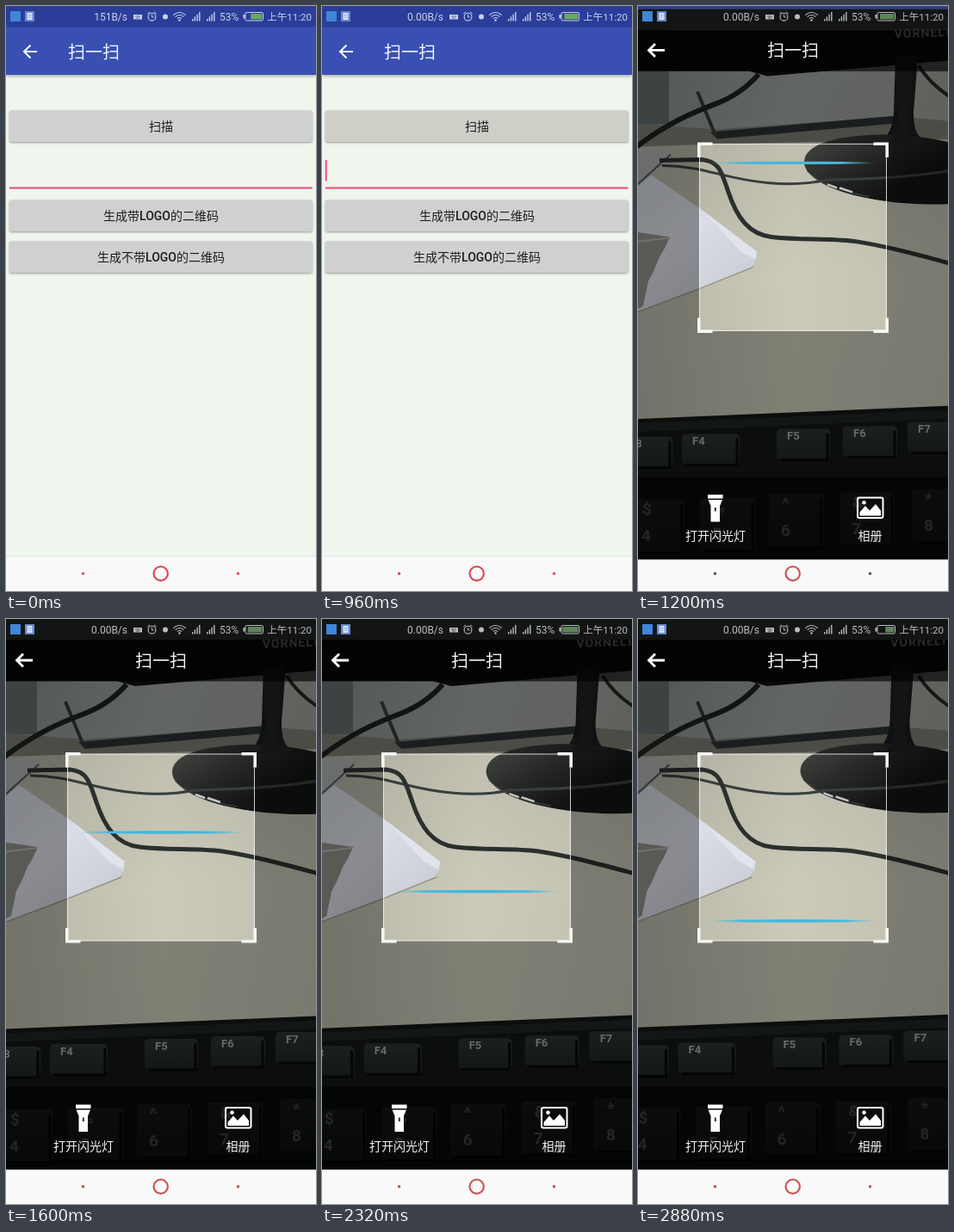
Write an HTML page with a canvas that moves like this. It is 360 by 680 pixels and loops after 2.96 s.

```html
<!DOCTYPE html>
<html lang="zh-CN">
<head>
<meta charset="utf-8">
<title>扫一扫</title>
<style>
html, body { margin: 0; width: 100%; height: 100%; overflow: hidden; background: #eff6ee; }
canvas { display: block; width: 360px; height: 680px; }
</style>
</head>
<body>
<canvas id="stage"></canvas>
<script>
const W = 360, H = 680, LOOP = 2960, STEP = 80;
const FONT = 'Roboto, "Noto Sans CJK SC", "Noto Sans CJK", sans-serif';
const canvas = document.getElementById('stage');
const c = canvas.getContext('2d');
const dpr = window.devicePixelRatio || 1;
canvas.width = W * dpr;
canvas.height = H * dpr;

// Piecewise linear track: [time, value] pairs
function track(points, t) {
  let [t0, v0] = points[0];
  if (t <= t0) return v0;
  for (const [t1, v1] of points) {
    if (t < t1) return v0 + (v1 - v0) * (t - t0) / (t1 - t0);
    t0 = t1; v0 = v1;
  }
  return v0;
}
const SCAN = [[1080, 0], [1200, 22], [1400, 59], [1600, 91], [1800, 115], [2000, 136], [2280, 157], [2560, 176], [2880, 194]];
const SLIDE = [[1040, 30], [1120, 13], [1200, 3.4], [1280, 0.6], [1360, 0]];
const DRIFT = [[1600, 0], [2000, -1.5], [2560, -3], [2880, -4.5]];
const CHARGE = [[0, 14], [960, 17], [2000, 18], [2560, 20], [2800, 20], [2880, 11]];

function rect(x, y, w, h, color) {
  c.fillStyle = color;
  c.fillRect(x, y, w, h);
}
function shape(d, color) {
  c.fillStyle = color;
  c.fill(new Path2D(d));
}
function line(d, color, width, cap = 'butt') {
  c.strokeStyle = color;
  c.lineWidth = width;
  c.lineCap = cap;
  c.stroke(new Path2D(d));
}
function disc(x, y, r, color) {
  c.fillStyle = color;
  c.beginPath();
  c.arc(x, y, r, 0, Math.PI * 2);
  c.fill();
}
function ring(x, y, r, color, width) {
  c.strokeStyle = color;
  c.lineWidth = width;
  c.beginPath();
  c.arc(x, y, r, 0, Math.PI * 2);
  c.stroke();
}
function rounded(x, y, w, h, r) {
  c.beginPath();
  c.roundRect(x, y, w, h, r);
}
function text(str, x, y, size, color, align = 'left', weight = 400) {
  c.font = `${weight} ${size}px ${FONT}`;
  c.textAlign = align;
  c.textBaseline = 'alphabetic';
  c.fillStyle = color;
  c.fillText(str, x, y);
}
function gradient(x0, y0, x1, y1, ...colors) {
  const g = c.createLinearGradient(x0, y0, x1, y1);
  colors.forEach((col, i) => g.addColorStop(i / (colors.length - 1), col));
  return g;
}
function shadow(color, blur, y) {
  c.shadowColor = color;
  c.shadowBlur = blur * dpr;
  c.shadowOffsetY = y * dpr;
}

function statusBar(t, inCamera) {
  const ink = inCamera ? '#b9bbc0' : '#c9d0ea';
  rect(5, 6, 12, 12, '#3f86d8');
  rect(22, 6, 11, 12, '#6389d2');
  rect(24.5, 8, 6, 8, '#dde5f6');
  line('M25.5 10.5H29.5M25.5 13H29.5', '#6f8bd0', 0.8);
  text(t < 480 ? '151B/s' : '0.00B/s', 141, 17, 12, ink, 'right');

  rect(148, 10, 10, 5.5, ink);
  line('M150 12H156M151 14H155', inCamera ? '#222' : '#2c3e99', 0.7);
  ring(169.5, 12.7, 4.4, ink, 1.1);
  line('M169.5 10V13H171.8M164.3 9L167 6.8M172 6.8L174.7 9', ink, 1);
  disc(185, 12.5, 3, ink);
  for (const r of [3.5, 6.5, 9.5]) {
    c.strokeStyle = ink;
    c.lineWidth = 1.2;
    c.beginPath();
    c.arc(201.5, 17, r, -Math.PI * 0.77, -Math.PI * 0.23);
    c.stroke();
  }
  disc(201.5, 16.5, 1.2, ink);
  for (const x of [216, 233]) {
    for (let i = 0; i < 4; i++) rect(x + i * 2.7, 15 - i * 2.7, 1.4, 2.5 + i * 2.7, ink);
  }
  text('53%', 248, 17, 12, ink);
  c.strokeStyle = ink;
  c.lineWidth = 1;
  rounded(278, 7.5, 20.5, 9.5, 1.5);
  c.stroke();
  rect(275.5, 10, 2, 4.5, ink);
  const w = Math.min(18, track(CHARGE, t) - 1);
  rect(297.3 - w, 9, w, 6.5, inCamera ? '#5d8658' : '#69a860');
  text('上午11:20', 355, 17, 11.5, ink, 'right');
}

function navIcons(ringColor, dotColor) {
  ring(179.7, 659.7, 8.2, ringColor, 2.1);
  disc(89.5, 659.7, 1.8, dotColor);
  disc(269.5, 659.7, 1.8, dotColor);
}

function button(label, y, color) {
  c.save();
  shadow('rgba(0,0,0,.38)', 2.5, 1);
  rounded(4, y, 351.5, 36.5, 2);
  c.fillStyle = color;
  c.fill();
  c.restore();
  text(label, 180, y + 23.5, 14, '#1d1d1d', 'center', 500);
}

function formPage(t) {
  rect(0, 0, W, H, '#eff6ee');
  c.save();
  shadow('rgba(0,0,0,.4)', 4, 1);
  rect(0, 0, W, 80, '#3950b2');
  c.restore();
  rect(0, 0, W, 24.5, '#2b3d99');
  line('M36 53H21.5M28.5 45.5L21 53L28.5 60.5', '#fff', 2);
  text('扫一扫', 72, 60.5, 20, '#f4f6ff');

  button('扫描', 121.5, t >= 880 ? '#cfcec7' : '#d0d0d0');
  button('生成带LOGO的二维码', 225.5, '#d0d0d0');
  button('生成不带LOGO的二维码', 273.5, '#d0d0d0');
  const pink = t < 480 ? '#e5487d' : '#f5427f';
  rect(4, 210.5, 351.5, 2, pink);
  if (t >= 480 && t < 1040) rect(3.8, 179, 1.8, 24.5, pink);
  rect(0, 639, W, 1, '#e2e4e2');
  rect(0, 640, W, 40, '#f9f9f9');
}

function keyCap(x, y, w, h) {
  c.fillStyle = gradient(0, y, 0, y + h, '#2c322f', '#1e2421');
  rounded(x, y, w, h, 5);
  c.fill();
  line(`M${x + 4} ${y + h}H${x + w - 3}V${y + 5}`, '#070908', 3);
}

function keyboard() {
  shape('M-10 477L370 461V660H-10Z', '#121614');
  shape('M-10 482L370 466V476L-10 492Z', '#1d2320');
  const top = [['F3', -22, 497, 62], ['F4', 51, 494, 67], ['F5', 161, 488, 62], ['F6', 238, 485, 63], ['F7', 313, 480, 62]];
  for (const [name, x, y, w] of top) {
    keyCap(x, y, w, 36);
    text(name, x + 12, y + 12.5, 13, '#a2a8a4', 'left', 700);
  }
  const digits = [['$', '4', -10, 570], ['%', '5', 72, 568], ['^', '6', 152, 564], ['&', '7', 234, 562], ['*', '8', 318, 558]];
  for (const [sign, digit, x, y] of digits) {
    keyCap(x, y, 64, 62);
    text(sign, x + 15, y + 18, 19, '#8d938f', 'left', 700);
    text(digit, x + 14, y + 49, 19, '#8d938f', 'left', 700);
  }
}

function monitorStand() {
  shape('M299 55H325L320 120C320 140 324 148 334 154L280 156C292 147 296 136 297 120Z', '#1a1b1c');
  const base = 'M193 178C193 160 220 148 278 146C325 146 352 152 376 159V226C314 230 266 222 236 212C210 203 193 191 193 178Z';
  shape(base, gradient(220, 145, 270, 225, '#3f413d', '#262827', '#121413'));
  line('M196 188C212 204 240 213 268 218', '#4b4e4d', 1);
  line('M220 204L231 208M234 208L249 213', '#c4c8c5', 2.4);
  shape('M300 70H320L315 130C315 143 317 149 324 155L291 157C301 145 302 136 302 122Z', '#1e201f');
}

function photo(t) {
  const dx = track(DRIFT, t), dy = dx * 0.35;
  rect(0, 0, W, H, gradient(0, 150, 0, 470, '#bfbeaf', '#cccbba', '#cac9b8'));
  rect(0, 150, W, 330, gradient(0, 0, W, 0, 'rgba(0,0,0,.1)', 'rgba(0,0,0,0)', 'rgba(0,0,0,.05)'));
  rect(0, 24, W, 128, gradient(0, 24, W, 150, '#7f8786', '#9ba09e', '#989a93'));
  rect(0, 24, 36, 110, '#616a69');
  shape('M0 133L90 140L300 125L360 130V151L90 157L0 160Z', '#77786e');
  shape('M84 143L300 124V133L92 151Z', '#2b302f');
  line('M69 96L90 147', '#333837', 4);
  shape('M0 24H360V60L150 78L128 72H0Z', '#0c0e0d');

  c.save();
  c.translate(dx / 3, 0);
  shape('M-5 202L14 192L72 232L138 282L137 292L130 301L72 325L-5 354Z', gradient(0, 200, 110, 330, '#cdd1da', '#dadde6', '#cbced5'));
  shape('M76 235L138 282L136 291L119 282Z', '#e1e4eb');
  line('M134 300L72 325L-5 354', '#96958c', 1.5);
  shape('M-5 163L39 166L34 177L-5 210Z', '#a9adac');
  line('M38 169L-5 208', '#505453', 2);
  shape('M-5 259L37 265L31 278L25 288L18 305L12 316L6 345L-5 352Z', '#8d8d88');
  line('M-5 271L36 266', '#b1b1ab', 2);
  c.restore();

  c.save();
  c.translate(dx, dy);
  monitorStand();
  c.restore();
  line('M-3 161C34 133 62 121 91 110C112 102 127 91 140 76', '#1c201f', 6);
  line('M326 66C335 81 347 92 362 102', '#222625', 4);
  line('M28 182C75 182 101 198 150 202C181 205 200 203 218 199C249 198 315 197 362 188', '#393d3b', 3);
  line('M25 176L74 175C95 177 97 190 105 213C115 243 129 262 155 265C190 269 220 266 251 270C290 276 326 286 363 296', '#2b2f2d', 5);

  c.save();
  c.translate(dx, dy);
  keyboard();
  c.translate(298, 34);
  c.rotate(-0.04);
  c.letterSpacing = '1px';
  text('VORNELT', 0, 0, 14, '#b4b6b8', 'left', 700);
  c.restore();
}

function scanFrame(t) {
  const x = 71.5, y = 157, size = 217;
  c.fillStyle = 'rgba(0,0,0,.37)';
  c.beginPath();
  c.rect(0, 0, W, H);
  c.rect(x, y, size, size);
  c.fill('evenodd');
  c.strokeStyle = 'rgba(255,255,255,.8)';
  c.lineWidth = 1;
  c.strokeRect(x, y, size, size);
  for (const [cx, cy, sx, sy] of [[69, 155, 1, 1], [291, 155, -1, 1], [69, 376.5, 1, -1], [291, 376.5, -1, -1]]) {
    c.save();
    c.translate(cx, cy);
    c.scale(sx, sy);
    shape('M0 0H17.5V3.6H3.6V17.5H0Z', '#f6f6f3');
    c.restore();
  }
  c.fillStyle = gradient(82, 0, 278, 0, 'rgba(70,185,222,0)', '#46b9de', '#3fb9e0', '#3fb9e0', '#46b9de', 'rgba(70,185,222,0)');
  c.beginPath();
  c.ellipse(180, y + track(SCAN, t), 98, 1.7, 0, 0, Math.PI * 2);
  c.fill();
}

function cameraControls() {
  rect(0, 24, W, 48.5, 'rgba(0,0,0,.65)');
  rect(0, 0, W, 24, '#131514');
  rect(0, 544, W, 96, 'rgba(0,0,0,.6)');
  line('M31 48H13M20 40.5L12.5 48L20 55.5', '#fff', 2.8);
  text('扫一扫', 180, 56, 20, '#f5f5f5', 'center');

  shape('M81 564.5H98.5V569H81ZM81.5 570.5H98L95 577.5V596H84.5V577.5Z', '#fff');
  rect(88.8, 579.5, 2, 4.5, '#333');
  c.strokeStyle = '#fff';
  c.lineWidth = 2;
  rounded(255, 568, 29.5, 23.5, 2);
  c.stroke();
  shape('M257.5 589V585L264 577.5L269 583L276 575.5L282 583V589Z', '#fff');
  disc(262.5, 573.8, 2.3, '#fff');
  text('打开闪光灯', 90, 618, 14, '#f2f2f2', 'center');
  text('相册', 269.5, 618, 14, '#f2f2f2', 'center');
}

function cameraPage(t) {
  photo(t);
  scanFrame(t);
  cameraControls();
  rect(0, 640, W, 40, '#f9f9f9');
}

function draw(t) {
  c.setTransform(dpr, 0, 0, dpr, 0, 0);
  c.clearRect(0, 0, W, H);
  const inCamera = t >= 1120;
  if (t < 1360) formPage(t);
  if (inCamera) {
    c.save();
    c.globalAlpha = t < 1200 ? 0.75 : 1;
    c.translate(0, track(SLIDE, t));
    cameraPage(t);
    c.restore();
  }
  // System bars stay put while the window slides in
  statusBar(t, inCamera);
  if (inCamera) navIcons('#cb524d', t < 1440 ? '#555' : '#c4544e');
  else navIcons('#dc4453', '#e0505e');
}

const start = performance.now();
function tick() {
  const t = (performance.now() - start) % LOOP;
  draw(Math.floor(t / STEP) * STEP);
  requestAnimationFrame(tick);
}
tick();
</script>
</body>
</html>
```
